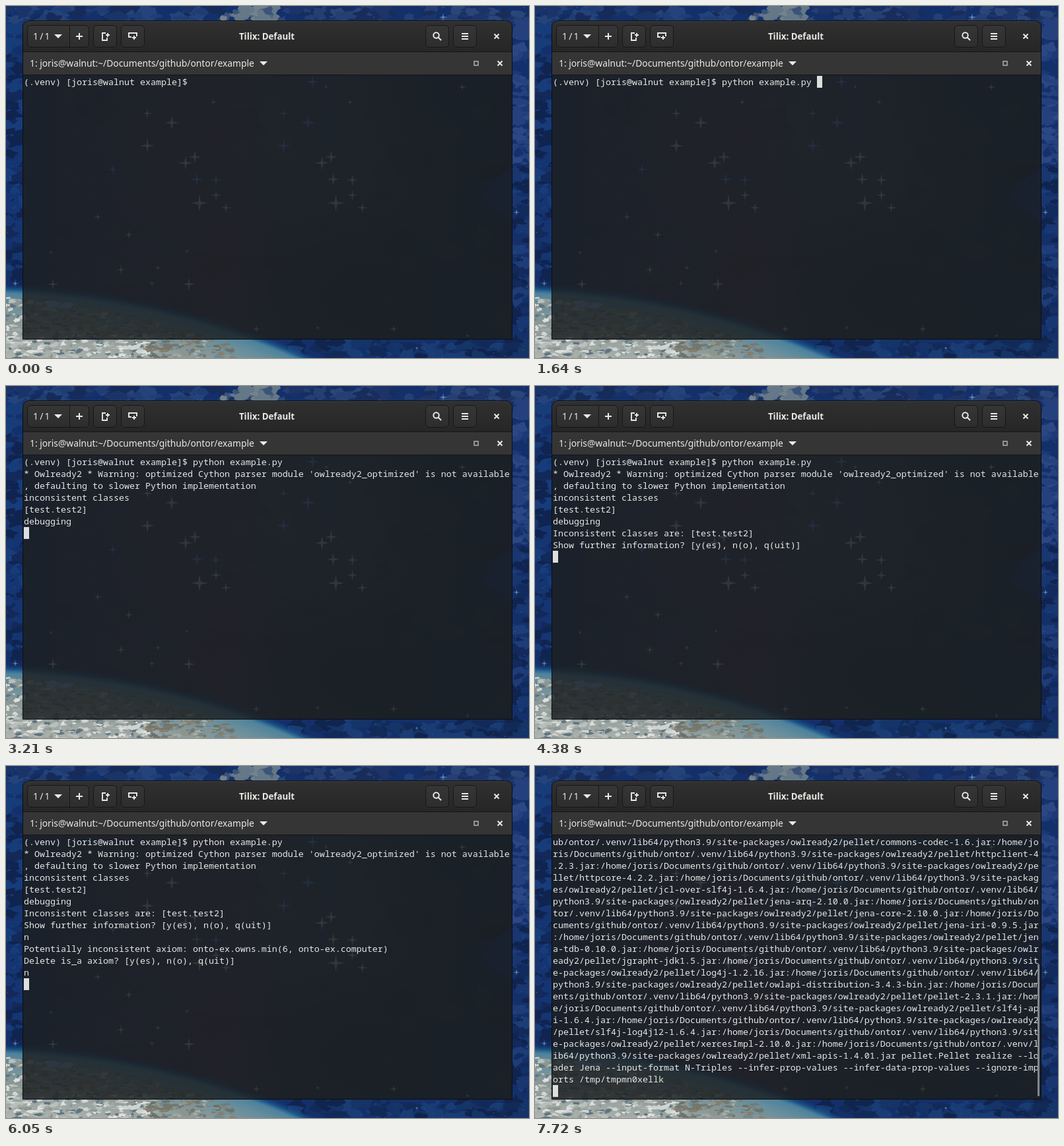
Animation of 792x534 px, one loop 8000 ms. Source, as an HTML page with a canvas:

```html
<!DOCTYPE html>
<html lang="en">
<head>
<meta charset="utf-8">
<title>Terminal session</title>
<style>
html, body { margin: 0; width: 100%; height: 100%; overflow: hidden; background: #14306a; }
#stage { position: relative; width: 792px; height: 534px; overflow: hidden; }
#stage > * { position: absolute; left: 0; top: 0; }
svg text { font: 13.8px "Noto Sans", "Open Sans", sans-serif; fill: #e9e9e5; }
svg .title { font-size: 13.3px; font-weight: 700; }
#stage #screen {
  left: 27px; top: 106px; margin: 0; white-space: pre; color: #e6e7e6;
  font: 13.3333px/18px "Noto Sans Mono", "Liberation Mono", monospace;
  font-variant-ligatures: none;
}
#cursor { width: 8px; height: 18px; background: #dedede; }
#stage #bar { left: 761px; top: 300px; width: 3px; height: 201px; border-radius: 2px; background: #84888a; }
</style>
</head>
<body>
<div id="stage">
  <canvas id="sky" width="792" height="534"></canvas>
  <svg width="792" height="534" viewBox="0 0 792 534">
    <defs>
      <linearGradient id="head" x1="0" y1="0" x2="0" y2="1">
        <stop offset="0" stop-color="#303030"/><stop offset="1" stop-color="#262626"/>
      </linearGradient>
      <linearGradient id="btn" x1="0" y1="0" x2="0" y2="1">
        <stop offset="0" stop-color="#363636"/><stop offset="1" stop-color="#2d2d2d"/>
      </linearGradient>
    </defs>
    <rect x="26" y="104" width="740" height="401" fill="#1c1f22" fill-opacity=".82"/>
    <path d="M26 70V31a8 8 0 0 1 8-8H758a8 8 0 0 1 8 8V70Z" fill="url(#head)"/>
    <path d="M33 23.5H759" stroke="#414141"/>
    <rect x="26" y="70" width="740" height="34" fill="#353535"/>
    <path d="M26 69.5H766M26 104.5H766" stroke="#151515"/>
    <path d="M25.5 505.5V31a8.5 8.5 0 0 1 8.5-8.5H758a8.5 8.5 0 0 1 8.5 8.5V505.5Z" fill="none" stroke="#0b0e14"/>
    <g fill="url(#btn)" stroke="#171717">
      <rect x="32.5" y="29.5" width="93" height="33" rx="5"/>
      <rect x="132.5" y="29.5" width="35" height="33" rx="5"/>
      <rect x="174.5" y="29.5" width="35" height="33" rx="5"/>
      <rect x="635.5" y="29.5" width="35" height="33" rx="5"/>
      <rect x="677.5" y="29.5" width="35" height="33" rx="5"/>
      <path d="M96.5 30V62"/>
    </g>
    <path d="M73 43H85L79 49ZM384 84H396L390 90Z" fill="#e9e9e5"/>
    <g fill="none" stroke="#e9e9e5" stroke-width="2">
      <path d="M106 46H116M111 41V51"/>
      <path d="M151 41H146V52H153V48M151 44H157M154 41V47" stroke-width="1.9"/>
      <path d="M190 47H186V41H198V46M191 48H197M194 45V51" stroke-width="1.9"/>
      <circle cx="651.5" cy="44.5" r="4.2"/>
      <path d="M654.5 47.5L659 52"/>
      <path d="M690 42H700M690 46H700M690 50H700"/>
      <path d="M739.5 42.5L746.5 49.5M746.5 42.5L739.5 49.5"/>
      <path d="M744.5 83.5L751.5 90.5M751.5 83.5L744.5 90.5"/>
      <rect x="709" y="84" width="6" height="6" stroke="#a9a9a7" stroke-width="1.6"/>
    </g>
    <text x="41" y="51">1&thinsp;/&thinsp;1</text>
    <text class="title" x="395" y="51" text-anchor="middle">Tilix: Default</text>
    <text x="36" y="92">1: joris@walnut:~/Documents/github/ontor/example</text>
  </svg>
  <div id="cursor"></div>
  <pre id="screen"></pre>
  <div id="bar"></div>
</div>
<script>
const $ = id => document.getElementById(id);

// ---- wallpaper ----
const c = $('sky').getContext('2d');
let seed = 71;
const rnd = (a = 1, b = 0) => {
  seed = (seed * 1664525 + 1013904223) >>> 0;
  return b + (a - b) * seed / 4294967296;
};
const pick = list => list[Math.floor(rnd(list.length))];

function blotch(x, y, rx, ry, color) {
  c.fillStyle = color;
  c.beginPath();
  for (let i = 0; i < 12; i++) {
    const a = i * Math.PI / 6, k = rnd(1.2, .5);
    c.lineTo(x + Math.cos(a) * rx * k, y + Math.sin(a) * ry * k);
  }
  c.fill();
}

// blotches scattered over a box
function scatter(n, x, y, w, h, size, colors) {
  for (let i = 0; i < n; i++) {
    const r = rnd(size, size * .25);
    blotch(x + rnd(w), y + rnd(h), r, r * rnd(.9, .35), pick(colors));
  }
}

function haze(x, y, r, rgb, alpha) {
  const g = c.createRadialGradient(x, y, 0, x, y, r);
  g.addColorStop(0, `rgba(${rgb},${alpha})`);
  g.addColorStop(1, `rgba(${rgb},0)`);
  c.fillStyle = g;
  c.fillRect(x - r, y - r, 2 * r, 2 * r);
}

function star(x, y, r, color) {
  const q = r * .15;
  c.fillStyle = color;
  c.beginPath();
  for (let i = 0; i < 8; i++) {
    const a = i * Math.PI / 4, d = i % 2 ? q * 1.4 : r;
    c.lineTo(x + Math.cos(a) * d, y + Math.sin(a) * d);
  }
  c.fill();
  c.beginPath();
  c.arc(x, y, r * .24, 0, 7);
  c.fill();
}

function nebula() {
  c.fillStyle = '#14306a';
  c.fillRect(0, 0, 792, 534);
  scatter(90, 0, 0, 26, 440, 22, ['#12295a', '#153572', '#173c7a', '#102450']);
  scatter(60, 0, 0, 330, 22, 20, ['#1a3468', '#1f3d72', '#162b5a', '#24437a']);
  scatter(60, 415, 0, 377, 22, 20, ['#1d3468', '#263f72', '#182d5c', '#2a4678']);
  scatter(70, 768, 20, 24, 220, 18, ['#1c3876', '#24417e', '#17306a', '#2b4784']);
  scatter(70, 768, 240, 24, 290, 18, ['#122a5c', '#18366f', '#102450', '#1d3c78']);
  scatter(70, 430, 508, 362, 26, 20, ['#122a58', '#153468', '#10254e', '#1a3c74']);
  scatter(26, 328, 0, 82, 22, 18, ['#52677d', '#647887', '#3b5378', '#74828c']);

  const deep = c.createLinearGradient(26, 0, 766, 0);
  ['#182e58', '#2b2f50', '#34304c', '#26364f', '#182a42', '#172641']
    .forEach((color, i) => deep.addColorStop(i / 5, color));
  c.fillStyle = deep;
  c.fillRect(26, 104, 740, 401);
  c.save();
  c.beginPath();
  c.rect(26, 104, 740, 401);
  c.clip();
  haze(300, 190, 170, '70,52,74', .5);
  haze(350, 390, 110, '72,44,64', .4);
  haze(440, 180, 180, '50,66,94', .4);
  haze(560, 260, 150, '42,58,82', .35);
  haze(500, 440, 170, '14,32,44', .6);
  scatter(50, 30, 110, 730, 390, 45, ['rgba(70,58,82,.12)', 'rgba(30,58,78,.14)', 'rgba(10,20,34,.12)']);
  c.fillStyle = '#0f2c70';
  c.beginPath();
  c.moveTo(766, 244);
  [[750, 256], [734, 268], [722, 294], [732, 306], [750, 316], [766, 330]].forEach(p => c.lineTo(...p));
  c.fill();
  c.restore();
}

function stars() {
  for (let i = 0; i < 320; i++) {
    c.fillStyle = pick(['rgba(150,175,205,.55)', 'rgba(90,130,190,.6)', 'rgba(190,190,150,.4)']);
    c.fillRect(Math.floor(rnd(792)), Math.floor(rnd(534)), 1, 1);
  }
  const pale = '#93a69f', blue = '#4377c4';
  const twins = [[214, 163, 8], [251, 177, 11], [214, 212, 11], [272, 238, 11], [286, 229, 10],
    [289, 263, 10], [318, 264, 9], [318, 287, 8], [293, 299, 13], [333, 306, 8]];
  twins.forEach(([x, y, r], i) => {
    star(x, y, r, i == 5 || i == 6 ? blue : pale);
    star(x + 206.5, y, r, i < 3 ? blue : pale);
  });
  const singles = [[162, 248, 8], [464, 115, 10], [139, 320, 6], [186, 347, 7], [174, 400, 7],
    [230, 397, 5], [221, 421, 5], [277, 422, 10], [71, 422, 9], [68, 374, 4], [274, 372, 4],
    [485, 123, 4], [521, 146, 5], [314, 146, 5], [691, 123, 6], [587, 490, 6], [379, 490, 6],
    [472, 488, 4], [699, 500, 4], [773, 313, 5], [14, 421, 5], [662, 17, 6], [622, 519, 3]];
  singles.forEach(([x, y, r], i) => star(x, y, r, i < 2 ? blue : i > 18 ? '#5f86b4' : pale));
}

function earth() {
  const x = -40, y = 1636, R = 1206;
  const disc = (r, fill) => {
    c.fillStyle = fill;
    c.beginPath();
    c.arc(x, y, r, 0, 7);
    c.fill();
  };
  const glow = c.createRadialGradient(x, y, R, x, y, R + 9);
  glow.addColorStop(0, 'rgba(30,100,150,.8)');
  glow.addColorStop(1, 'rgba(25,75,140,0)');
  disc(R + 9, glow);
  const ground = c.createRadialGradient(x, y, R - 110, x, y, R);
  ground.addColorStop(0, '#b4b9b4');
  ground.addColorStop(.5, '#8f9a98');
  ground.addColorStop(.8, '#688e9c');
  ground.addColorStop(.95, '#4f829c');
  ground.addColorStop(1, '#25608a');
  disc(R, ground);
  c.save();
  c.beginPath();
  c.arc(x, y, R - 8, 0, 7);
  c.clip();
  const near = ['#cfd4d0', '#b9c0bb', '#dde0dc', '#a0a8a4', '#8d9692', '#5f7480'];
  const far = ['#8b958f', '#74776c', '#66726f', '#a2aca8', '#6f8a94', '#857f70'];
  for (let i = 0; i < 900; i++) {
    const px = rnd(345, -10), depth = rnd(105, 10 + px * .04);
    const py = y - Math.sqrt(R * R - (px - x) ** 2) + depth;
    const bright = px < 26 || (py > 500 && px < 215);
    blotch(px, py, rnd(9, 2), rnd(4, 1), pick(bright ? near : far));
  }
  for (let i = 0; i < 12; i++) blotch(rnd(104, 58), rnd(456, 448), 8, 2.5, '#7ea3d8');
  c.restore();
}

nebula();
stars();
earth();

// ---- session ----
const ask = 'Inconsistent classes are: [test.test2]\nShow further information? [y(es), n(o), q(uit)]\n';
const warning = "* Owlready2 * Warning: optimized Cython parser module 'owlready2_optimized' is not available\n" +
  ', defaulting to slower Python implementation\n';
const axiom = '\nPotentially inconsistent axiom: onto-ex.owns.min(6, onto-ex.computer)\n' +
  'Delete is_a axiom? [y(es), n(o), q(uit)]\n';

function javaCall() {
  const dir = '/home/joris/Documents/github/ontor/.venv/lib64/python3.9/site-packages/owlready2/pellet/';
  const jars = ('commons-codec-1.6 httpclient-4.2.3 httpcore-4.2.2 jcl-over-slf4j-1.6.4 jena-arq-2.10.0 ' +
    'jena-core-2.10.0 jena-iri-0.9.5 jena-tdb-0.10.0 jgrapht-jdk1.5 log4j-1.2.16 ' +
    'owlapi-distribution-3.4.3-bin pellet-2.3.1 slf4j-api-1.6.4 slf4j-log4j12-1.6.4 ' +
    'xercesImpl-2.10.0 xml-apis-1.4.01').split(' ');
  const line = jars.map(j => dir + j + '.jar').join(':') +
    ' pellet.Pellet realize --loader Jena --input-format N-Triples --infer-prop-values' +
    ' --infer-data-prop-values --ignore-imports /tmp/tmpmn0xellk';
  return line.slice(dir.indexOf('ub/ontor')).match(/.{1,92}/g).join('\n') + '\n';
}

// time, appended text, cursor visible
const steps = [
  [0, '(.venv) [joris@walnut example]$ ', 0], [220, '', 1], [440, 'p', 1], [630, 'y', 1],
  ...[...'thon e'].map((ch, i) => [800 + i * 112, ch, 1]),
  [1640, 'xample.py ', 1], [2040, '\n', 1], [2440, warning, 1], [2610, '', 0],
  [2690, 'inconsistent classes\n', 0], [3210, '[test.test2]\ndebugging\n', 1],
  [3740, ask, 1], [3790, '', 0], [4380, '', 1], [4810, 'n', 1],
  [5030, axiom, 1], [5600, '', 0], [5770, '', 1], [5810, 'n', 1], [6050, '\n', 1],
  [6580, ask, 1], [6620, '', 0], [7210, '', 1], [7530, 'y', 1]
];
let typed = '';
const states = steps.map(([at, add, on]) => ({ at, text: typed += add, on }));
states.push({ at: 7720, text: javaCall(), on: 1, bar: 1 });

let shown = null;
function draw(now) {
  const t = now % 8000;
  const s = states.findLast(v => v.at <= t) || states[0];
  if (s !== shown) {
    shown = s;
    const rows = s.text.split('\n');
    $('screen').textContent = s.text;
    $('cursor').style.left = 27 + rows[rows.length - 1].length * 8 + 'px';
    $('cursor').style.top = 88 + rows.length * 18 + 'px';
    $('cursor').style.visibility = s.on ? 'visible' : 'hidden';
    $('bar').style.visibility = s.bar ? 'visible' : 'hidden';
  }
}
function tick() {
  draw(performance.now());
  requestAnimationFrame(tick);
}
tick();
</script>
</body>
</html>
```
